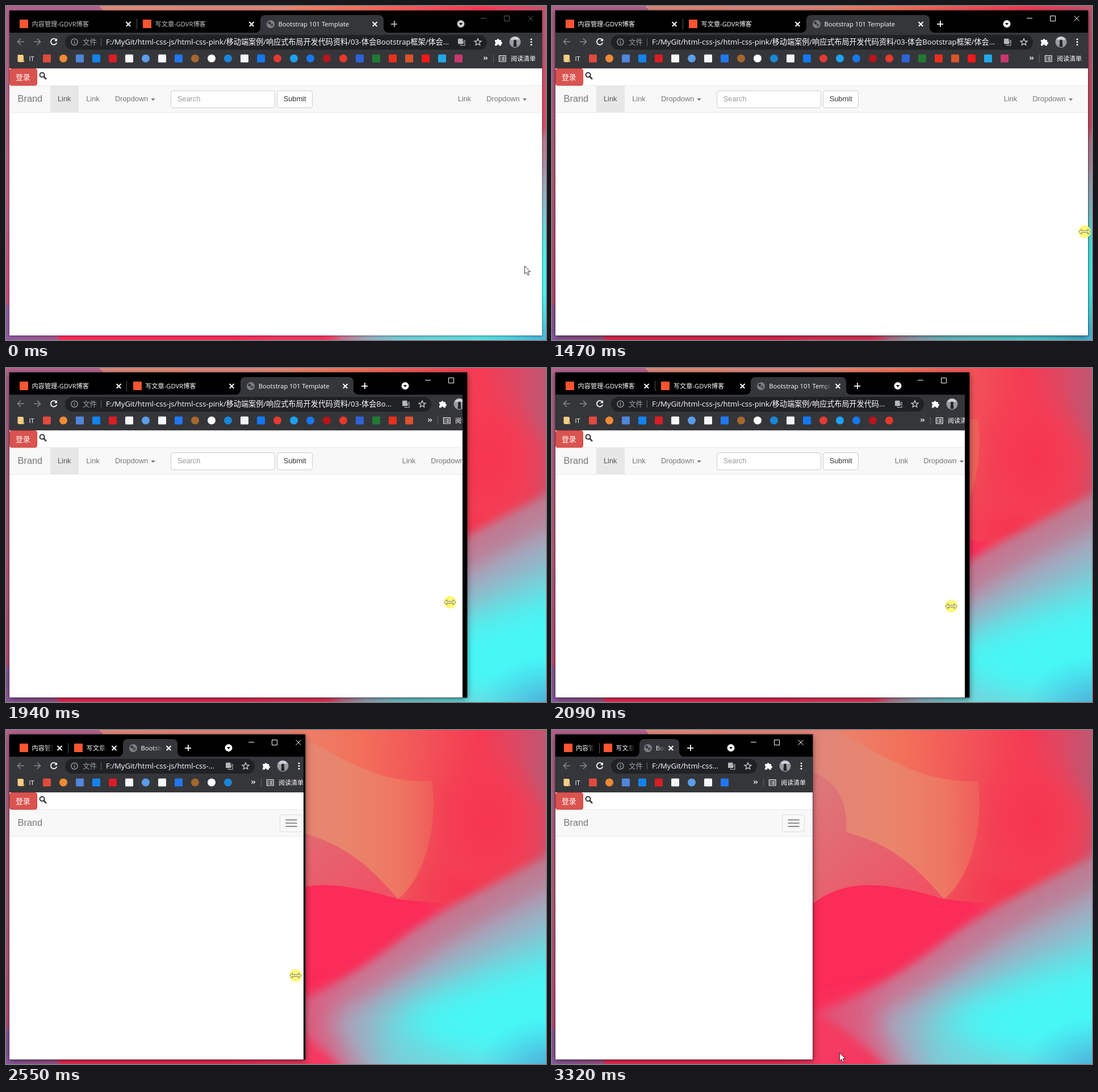
An HTML page that plays this animation: 951x589 px, repeating every 3370 ms.

```html
<!DOCTYPE html>
<html lang="zh-CN">
<head>
<meta charset="utf-8">
<title>Responsive window</title>
<style>
html, body { margin: 0; width: 100%; height: 100%; overflow: hidden; background: #f04a5c; }
body { position: relative; }
svg { position: absolute; top: 0; overflow: visible; }
svg, .lay { font-family: "Open Sans", "Noto Sans CJK SC", "Noto Sans CJK", sans-serif; }
.wall { left: 0; will-change: transform; }
.frame {
  position: absolute; left: 6px; top: 8px; width: calc(var(--o) - 6px); height: 573px;
  background: #000; box-shadow: 0 0 0 1px rgba(70, 50, 60, .25), 0 1px 5px rgba(0, 0, 0, .35);
}
.on .frame { box-shadow: 0 0 0 1px rgba(40, 40, 45, .55), 0 3px 11px rgba(0, 0, 0, .5); }
.clip { position: absolute; left: 0; top: 0; width: calc(var(--c) - 6px); height: 573px; overflow: hidden; }
/* Coordinates inside the layout are stage coordinates. */
.lay { position: absolute; left: -6px; top: -8px; width: var(--l); height: 589px; --p: min(217px, (var(--l) - 247px) / 3); }
.lay div { position: absolute; box-sizing: border-box; }
.lay .band { left: 0; right: -10px; }
.bar { top: 47px; height: 63px; background: #35363a; }
.page { top: 110px; height: 479px; background: #fff; }
.nav { top: 140px; height: 48px; background: #f8f8f8; border: solid #e7e7e7; border-width: 1px 0; }
.omni { left: 104px; right: 97px; top: 51px; height: 26px; border-radius: 13px; background: #202124; }
.url {
  left: 72px; right: 66px; top: 0; line-height: 25px; font-size: 13.1px; font-weight: 500; color: #fff;
  white-space: nowrap; overflow: hidden; text-overflow: ellipsis;
}
.tab { top: 16px; height: 31px; width: var(--p); left: calc(13.5px + var(--i) * var(--p)); }
.tab.live { background: #35363a; border-radius: 8px 8px 0 0; }
.live::before, .live::after { content: ""; position: absolute; bottom: 0; width: 8px; height: 8px; }
.live::before { left: -8px; background: radial-gradient(circle at 0 0, transparent 7.5px, #35363a 8px); }
.live::after { right: -8px; background: radial-gradient(circle at 100% 0, transparent 7.5px, #35363a 8px); }
.split { right: 0; top: 7px; width: 1px; height: 18px; background: #55565a; }
.icon { left: 10.5px; top: 8px; width: 15px; height: 15px; background: #fc5531; }
.live .icon {
  left: 11px; top: 8.5px; width: 14px; height: 14px; border-radius: 50%;
  background: radial-gradient(circle at 35% 35%, #35363a 2px, transparent 3px), radial-gradient(circle at 65% 60%, #4a4b4f 2px, transparent 3px), #7d8185;
}
.name {
  left: 32px; right: 26px; top: 0; line-height: 31px; font-size: 11.2px; white-space: nowrap; overflow: hidden;
  color: #c4c6c9; -webkit-mask: linear-gradient(to left, transparent, #000 16px); mask: linear-gradient(to left, transparent, #000 16px);
}
.on .name, .live .name { color: #fff; }
.shut { right: 10.5px; top: 11px; width: 9px; height: 9px; }
.shut::before, .shut::after { content: ""; position: absolute; left: -1px; top: 3.8px; width: 11px; height: 1.5px; background: #fff; transform: rotate(45deg); }
.shut::after { transform: rotate(-45deg); }
.thin .icon { left: 7px; }
.thin .live .icon { left: 8px; }
.thin .name { left: 28.5px; right: 9px; }
.thin .live .name { right: 24px; }
.thin .tab:not(.live) .shut { display: none; }
.plus {
  left: calc(32.5px + 3 * var(--p)); top: 26px; width: 11px; height: 11px; margin-left: -5.5px; --k: #b9bbbe;
  background: linear-gradient(var(--k), var(--k)) 50% / 100% 1.8px no-repeat, linear-gradient(var(--k), var(--k)) 50% / 1.8px 100% no-repeat;
}
.on .plus { --k: #fff; }
.left { left: 0; }
.right { right: 0; }
.boot { font: 12.8px "Liberation Sans", Arial, sans-serif; fill: #777; }
.ctl { stroke: #5c5c5c; fill: none; }
.on .ctl { stroke: #fff; }
.drop { fill: #c9cbce; }
.on .drop { fill: #fff; }
.small .wide, .lay:not(.small) .fold { display: none; }
</style>
</head>
<body>
<svg class="wall" width="951" height="589" viewBox="0 0 951 589">
  <defs>
    <linearGradient id="sky" gradientUnits="userSpaceOnUse" x1="160" x2="951" y1="60" y2="90">
      <stop offset="0" stop-color="#dc8a7c"/><stop offset=".45" stop-color="#ec8068"/><stop offset=".58" stop-color="#f3705a"/>
      <stop offset=".74" stop-color="#f25058"/><stop offset=".85" stop-color="#f53a52"/><stop offset=".92" stop-color="#e04662"/><stop offset="1" stop-color="#bd5872"/>
    </linearGradient>
    <linearGradient id="petal" gradientUnits="userSpaceOnUse" x1="440" x2="755" y1="0" y2="0">
      <stop offset="0" stop-color="#e0857a"/><stop offset=".5" stop-color="#e9856c"/><stop offset=".8" stop-color="#ee7662"/><stop offset="1" stop-color="#f05c5a"/>
    </linearGradient>
    <linearGradient id="rose" gradientUnits="userSpaceOnUse" x1="470" x2="640" y1="100" y2="300"><stop offset="0" stop-color="#dc777a"/><stop offset="1" stop-color="#ef5264"/></linearGradient>
    <linearGradient id="mauve" x1="0" x2="0" y1="0" y2="1"><stop offset="0" stop-color="#b3628e"/><stop offset=".5" stop-color="#c25f80"/><stop offset="1" stop-color="#c84676"/></linearGradient>
    <linearGradient id="dusk" x1="0" x2="1"><stop offset="0" stop-color="#8f5ba4"/><stop offset="1" stop-color="#a8548e"/></linearGradient>
    <linearGradient id="haze" gradientUnits="userSpaceOnUse" x1="460" x2="951" y1="0" y2="0">
      <stop offset="0" stop-color="#e84a70"/><stop offset=".3" stop-color="#cc7290"/><stop offset="1" stop-color="#bc7c92"/>
    </linearGradient>
    <radialGradient id="glow"><stop offset="0" stop-color="#f63450"/><stop offset=".5" stop-color="#f63a52" stop-opacity=".8"/><stop offset="1" stop-color="#f64054" stop-opacity="0"/></radialGradient>
    <radialGradient id="deep"><stop offset="0" stop-color="#48a8d8"/><stop offset="1" stop-color="#48c4e8" stop-opacity="0"/></radialGradient>
    <filter id="b8" x="-20%" y="-20%" width="140%" height="140%"><feGaussianBlur stdDeviation="8"/></filter>
    <filter id="b20" x="-30%" y="-30%" width="160%" height="160%"><feGaussianBlur stdDeviation="20"/></filter>
    <filter id="b26" x="-40%" y="-40%" width="180%" height="180%"><feGaussianBlur stdDeviation="26"/></filter>
  </defs>
  <rect width="951" height="589" fill="url(#sky)"/>
  <path d="M690 298C760 240 790 120 740 90L951 120V330L740 330Z" fill="#f23e54" opacity=".75" filter="url(#b20)"/>
  <ellipse cx="850" cy="160" rx="100" ry="150" fill="url(#glow)"/>
  <path d="M440 72C500 85 520 125 518 180C600 203 640 240 690 298C735 265 762 170 750 90C690 92 650 80 590 50L500 0H300Z" fill="url(#petal)"/>
  <path d="M0 70H440C500 80 522 125 518 180C600 203 640 240 690 298L700 330H0Z" fill="url(#rose)"/>
  <path d="M0 589V400C300 400 420 335 464 303C530 255 610 275 690 298L750 305C800 302 820 310 830 340L700 589Z" fill="#fb2c58"/>
  <ellipse cx="810" cy="285" rx="85" ry="60" fill="url(#glow)"/>
  <path d="M440 600V500L620 460L700 600Z" fill="#f43a62" filter="url(#b20)"/>
  <path d="M462 500C590 450 640 410 700 365C780 305 880 265 1000 195V650H640C590 590 530 530 462 500Z" fill="url(#haze)" filter="url(#b8)"/>
  <path d="M570 505C650 465 700 428 760 388C830 343 900 312 1020 248V660H650Z" fill="#a3a9bf" filter="url(#b20)"/>
  <path d="M640 510C720 460 790 420 1020 315V660H680Z" fill="#74d2da" filter="url(#b26)"/>
  <path d="M690 512C750 470 830 440 1020 385V565C900 600 760 590 690 512Z" fill="#46f7f5" filter="url(#b26)"/>
  <ellipse cx="960" cy="600" rx="130" ry="95" fill="url(#deep)"/>
  <path d="M0 0H164L175 12V300L90 589H0Z" fill="url(#mauve)"/>
  <path d="M0 526C40 545 75 568 95 589H0Z" fill="url(#dusk)"/>
</svg>

<div class="frame"><div class="clip"><div class="lay">
  <div class="band bar"></div>
  <div class="tab" style="--i:0"><div class="icon"></div><div class="name">内容管理-GDVR博客</div><div class="shut"></div><div class="split"></div></div>
  <div class="tab" style="--i:1"><div class="icon"></div><div class="name">写文章-GDVR博客</div><div class="shut"></div></div>
  <div class="tab live" style="--i:2"><div class="icon"></div><div class="name">Bootstrap 101 Template</div><div class="shut"></div></div>
  <div class="plus"></div>
  <div class="omni"><div class="url">F:/MyGit/html-css-js/html-css-pink/移动端案例/响应式布局开发代码资料/03-体会Bootstrap框架/体会Bootstrap.html</div></div>
  <div class="band page"></div>
  <div class="band nav"></div>

  <svg class="left" width="944" height="589">
    <g fill="none" stroke="#85878b" stroke-width="1.6">
      <path d="M32 63H20.5M26 57.5L20.5 63L26 68.5M49 63H60.5M55 57.5L60.5 63L55 68.5"/>
      <path d="M88.6 60A5.3 5.3 0 1 0 89.3 64.5" stroke="#fff" stroke-width="1.8"/>
      <circle cx="120.5" cy="63.5" r="5.6" stroke="#a4a7ab" stroke-width="1.3"/>
      <path d="M120.5 62.5V66.5M120.5 60.2V61.5" stroke="#a4a7ab" stroke-width="1.4"/>
      <path d="M167.5 57V70" stroke="#5f6368" stroke-width="1"/>
    </g>
    <path d="M90 57V62H85Z" fill="#fff"/>
    <text x="135" y="68" font-size="12.6" fill="#9aa0a6">文件</text>
    <path d="M21 86H29.5L31 87.5V99H22.5L20.5 97.5V87Z" fill="#f3cd86"/>
    <path d="M29 95H32V99H29Z" fill="#d9a850"/>
    <text x="40.5" y="97" font-size="11" fill="#fff">IT</text>
    <g id="marks"></g>

    <rect x="6.5" y="110.5" width="48" height="29.5" rx="3.6" fill="#d9534f" stroke="#d43f3a"/>
    <text x="17" y="129.8" font-size="12.8" fill="#fff">登录</text>
    <circle cx="63.6" cy="121.5" r="4" fill="none" stroke="#333" stroke-width="2"/>
    <path d="M66.5 124.5L70.3 128.3" stroke="#333" stroke-width="2.6" stroke-linecap="round"/>
    <g class="boot">
      <text x="20.5" y="169.3" font-size="16.4">Brand</text>
      <g class="wide">
        <rect x="78" y="141" width="50" height="46" fill="#e7e7e7"/>
        <text x="91" y="168" fill="#555">Link</text><text x="141.2" y="168">Link</text><text x="192" y="168">Dropdown</text>
        <path d="M255.3 163H262.7L259 167Z"/>
        <g fill="#fff" stroke="#ccc"><rect x="290.5" y="149.5" width="183" height="30" rx="3.7"/><rect x="477.5" y="149.5" width="62" height="30" rx="3.7"/></g>
        <text x="301.8" y="168" fill="#999">Search</text><text x="488.7" y="168" fill="#333">Submit</text>
      </g>
    </g>
  </svg>

  <svg class="right" width="944" height="589">
    <g class="ctl"><path d="M836 21.5H846M877.5 17.5H886.5V26.5H877.5ZM919.5 17.5L928.5 26.5M928.5 17.5L919.5 26.5"/></g>
    <circle class="drop" cx="801" cy="31.5" r="6.5"/><path d="M798 30H804L801 34Z" fill="#000"/>
    <rect x="796" y="57.5" width="8.5" height="9.5" rx="1" fill="#b4b7bb"/>
    <path d="M805.5 60.5H808V69.5H800.5V68M803.5 63.5H806.8M805 62.3V63.5M806.3 63.5L803.3 67.3" fill="none" stroke="#b4b7bb" stroke-width="1.1"/>
    <path d="M831 57.6L832.7 61.6 837 62 833.7 64.8 834.7 69 831 66.8 827.3 69 828.3 64.8 825 62 829.3 61.6Z" fill="none" stroke="#d0d2d5" stroke-width="1.3"/>
    <path d="M861 60H864.5A2 2 0 1 1 868.5 60H872V63.2A2 2 0 1 1 872 67.2V70H868.6A2.1 2.1 0 0 0 864.4 70H861V66.6A2.1 2.1 0 0 0 861 62.8Z" fill="#fff"/>
    <circle cx="896.5" cy="63.5" r="10" fill="#9b9ca3"/>
    <path d="M888 59A10 10 0 0 1 905 59L899 60H893Z" fill="#cfd0d4"/>
    <path d="M893.5 72L894.2 63A2.6 2.6 0 1 1 898.8 63L899.5 72Z" fill="#26272b"/>
    <g fill="#fff"><circle cx="925" cy="58.7" r="1.5"/><circle cx="925" cy="63.5" r="1.5"/><circle cx="925" cy="68.3" r="1.5"/></g>
    <path d="M841.5 89.5L844 92 841.5 94.5M845 89.5L847.5 92 845 94.5" fill="none" stroke="#fff" stroke-width="1.2"/>
    <path d="M858.5 86V100" stroke="#5f6368"/>
    <path d="M868.5 87.5H880V98H868.5ZM870.5 90.3H872M873.5 90.3H878M870.5 92.8H872M873.5 92.8H878M870.5 95.3H872M873.5 95.3H878" fill="none" stroke="#fff" stroke-width="1.2"/>
    <text x="889" y="97" font-size="11" fill="#fff">阅读清单</text>
    <g class="boot wide"><text x="795.8" y="168">Link</text><text x="846.3" y="168">Dropdown</text><path d="M909.8 163H917.2L913.5 167Z"/></g>
    <g class="fold">
      <rect x="891.5" y="149.5" width="39" height="30" rx="3.7" fill="none" stroke="#ddd"/>
      <path d="M901.5 158.5H921.5M901.5 164.2H921.5M901.5 170H921.5" stroke="#888" stroke-width="1.9"/>
    </g>
  </svg>
</div></div></div>

<svg class="left" width="951" height="589">
  <g id="pointer">
    <path id="arrow" d="M.5.5V14.5L3.7 11.5L6 16.8L8.3 15.8L6 10.7H10.5Z" fill="#fff" stroke="#222" stroke-width=".9"/>
    <g id="sizer">
      <circle id="press" r="11" fill="#fdf76a" fill-opacity=".92"/>
      <path d="M-10 0L-5.5-4.5V-1.5H5.5V-4.5L10 0L5.5 4.5V1.5H-5.5V4.5Z" fill="#fffbb0" stroke="#555" stroke-width=".8"/>
    </g>
  </g>
</svg>

<script>
const LOOP = 3370;
const $ = s => document.querySelector(s);
const range = (a, b, d = 50) => Array.from({ length: (b - a) / d + 1 }, (_, i) => a + i * d);

// Bookmarks: c = circle, s = square
const marks = ("s#dd4b3e c#ee8a35 s#4f86dc s#1283ee s#d91d25 s#f6f6f6 c#5a9de8 s#f4f6fb s#2277f0 c#a5672f " +
  "c#ffffff c#1a86d8 s#f1f4fc s#1478f0 c#e33a33 c#1da1f2 c#1877f2 c#b8151b c#e8392b s#2f62d8 " +
  "s#1f7a33 s#e8301c s#d9532c s#f01818 s#22a8e8 s#c8386f").split(" ").map((m, i) => {
  const x = 72 + i * 29, el = document.createElementNS("http://www.w3.org/2000/svg", "rect");
  const set = { x: x - 7, y: 85.5, width: 14, height: 14, rx: m[0] === "c" ? 7 : 1.5, fill: m.slice(1) };
  for (const k in set) el.setAttribute(k, set[k]);
  $("#marks").append(el);
  return { x, el };
});

// time, pointer x, pointer y, outer edge, painted edge, layout edge
const keys = [
  [0, 913, 458, 944, 944, 944],
  [50, 925, 441, 944, 944, 944],
  [100, 941, 412, 944, 944, 944],
  [150, 970, 390, 944, 944, 944],
  [660, 950, 399, 944, 944, 944],
  [760, 944, 399, 944, 944, 944],
  [910, 944, 399, 944, 944, 944],
  [1470, 938, 398, 944, 944, 944],
  [1620, 912, 401, 934, 927, 942],
  [1770, 868, 405, 900, 889, 914],
  [1940, 782, 413, 812, 804, 846],
  [2090, 703, 420, 735, 727, 752],
  [2350, 578, 430, 605, 605, 609],
  [2500, 526, 432, 545, 542, 555],
  [2550, 510, 433, 527, 524, 535],
  [2700, 465, 434, 479, 477, 484],
  [2800, 438, 435, 459, 459, 458],
  [3000, 397, 435, 459, 459, 458],
  [3120, 402, 440, 459, 459, 458],
  [3220, 450, 500, 459, 459, 458],
  [3320, 506, 569, 459, 459, 458]
];

// The picture holds still between these moments.
const steps = [0, 50, 100, 150, 660, 710, 760, 910, ...range(1470, 1820), 1890, 1940,
  2000, 2040, 2090, 2160, 2210, 2250, ...range(2300, 3000), ...range(3120, 3320)];

function pose(t) {
  const i = keys.findLastIndex(k => k[0] <= t), a = keys[i], b = keys[i + 1] || a;
  const f = a === b ? 0 : (t - a[0]) / (b[0] - a[0]);
  return a.slice(1).map((v, n) => Math.round(v + (b[n + 1] - v) * f));
}

function draw(time) {
  const t = steps.findLast(s => s <= time);
  const [x, y, outer, painted, layout] = pose(t);
  const root = document.documentElement, lay = $(".lay");
  root.style.setProperty("--o", outer + "px");
  root.style.setProperty("--c", painted + "px");
  root.style.setProperty("--l", layout + "px");
  root.classList.toggle("on", t >= 910);
  lay.classList.toggle("small", layout < 720);
  lay.classList.toggle("thin", (layout - 247) / 3 < 80);
  for (const m of marks) m.el.style.display = m.x < layout - 130 ? "" : "none";

  const sizing = t >= 660 && t < 3120;
  $("#pointer").setAttribute("transform", `translate(${x} ${y})`);
  $("#arrow").style.display = sizing ? "none" : "";
  $("#sizer").style.display = sizing ? "" : "none";
  $("#press").style.display = t >= 910 ? "" : "none";
}

const start = performance.now();
function tick() {
  draw((performance.now() - start) % LOOP);
  requestAnimationFrame(tick);
}
tick();
</script>
</body>
</html>
```
